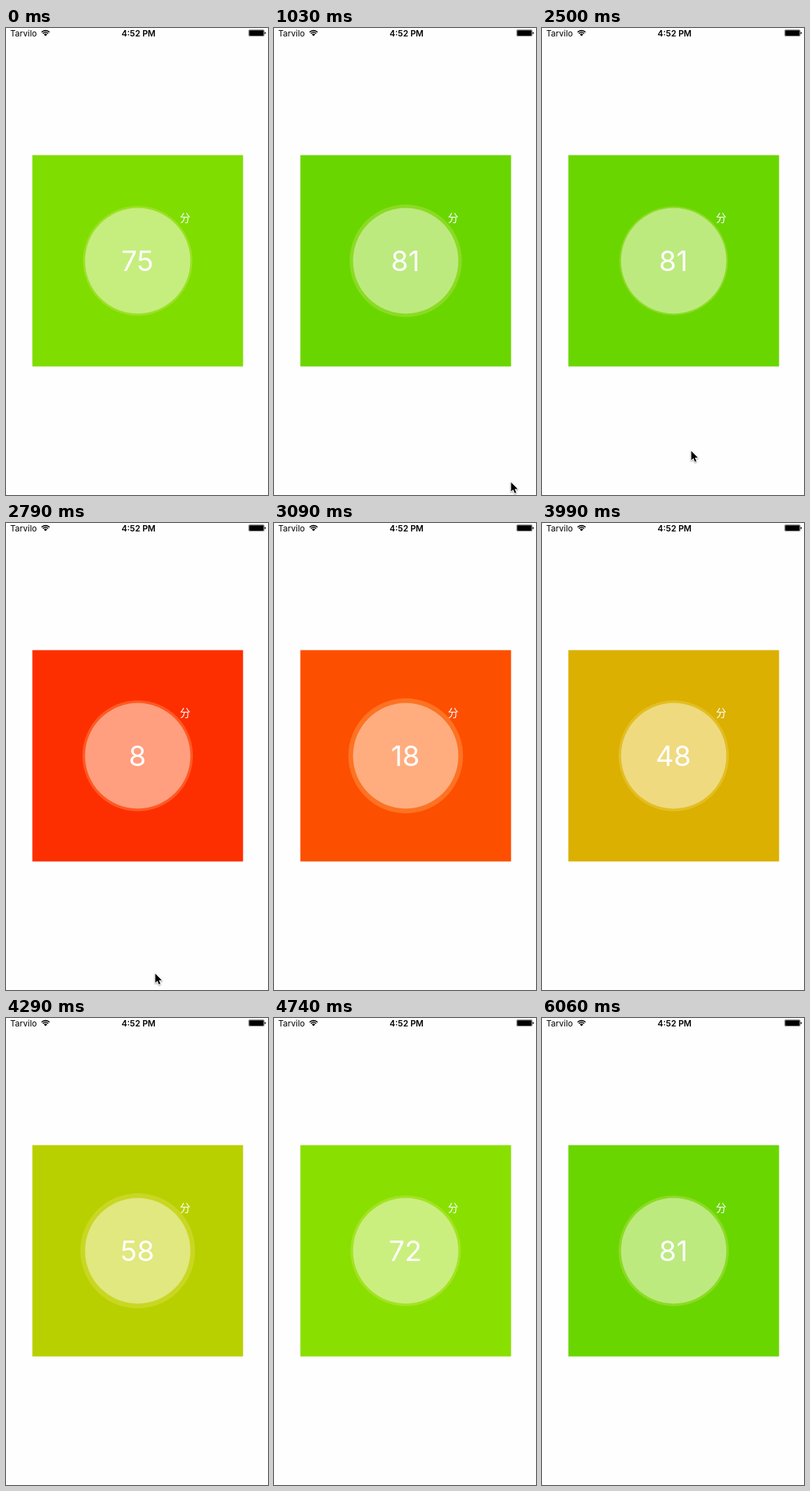
Recreate the animation shown at these times as an HTML page with a canvas. Size 373x663 px, loop 6.16 s.

```html
<!DOCTYPE html>
<html lang="en">
<head>
<meta charset="utf-8">
<title>Minute counter</title>
<style>
html, body { margin: 0; width: 100%; height: 100%; overflow: hidden; background: #fefefe; }
canvas { display: block; width: 373px; height: 663px; }
</style>
</head>
<body>
<canvas id="stage"></canvas>
<script>
const W = 373, H = 663, LOOP = 6160;
const CX = 187.5, CY = 330.5, DISC = 75;
const TAP = 2535, TICK = 30.25, GOAL = 81;
const SANS = 'Inter, Roboto, sans-serif';
const CJK = '"Noto Sans CJK SC", "Noto Sans CJK", "Noto Sans CJK JP", sans-serif';

const canvas = document.getElementById('stage');
const ctx = canvas.getContext('2d');
const dpr = window.devicePixelRatio || 1;
canvas.width = W * dpr;
canvas.height = H * dpr;
ctx.scale(dpr, dpr);

// The picture is held for about 147 ms at first, later for 150 ms.
function held(t) {
  const step = 2200 / 15;
  return t < 2640 ? Math.floor(t / step) * step : Math.floor((t + 60) / 150) * 150 - 60;
}

function countAt(t) {
  const n = t < TAP ? 75 + t / TICK : (t - TAP) / TICK;
  return Math.min(GOAL, Math.floor(n + 0.01));
}

// Red, through amber, to green.
function colorAt(n) {
  const red = Math.min(253, 383 - 3.42 * n);
  const green = Math.min(21 + 3.23 * n, 304 - 1.11 * n);
  return `rgb(${Math.round(red)}, ${Math.round(green)}, 0)`;
}

function ringAt(t) {
  return 79.5 - 2.3 * Math.cos((t - 160) / 1200 * 2 * Math.PI);
}

function label(text, x, y, font, color, align) {
  ctx.font = font;
  ctx.fillStyle = color;
  ctx.textAlign = align;
  ctx.fillText(text, x, y);
}

function disc(r, color) {
  ctx.fillStyle = color;
  ctx.beginPath();
  ctx.arc(CX, CY, r, 0, 2 * Math.PI);
  ctx.fill();
}

function wifi(x, y) {
  const from = -Math.PI * 0.75, to = -Math.PI * 0.25;
  ctx.strokeStyle = ctx.fillStyle = '#000';
  ctx.lineWidth = 1.6;
  for (const r of [8, 5.3]) {
    ctx.beginPath();
    ctx.arc(x, y, r, from, to);
    ctx.stroke();
  }
  ctx.beginPath();
  ctx.moveTo(x, y);
  ctx.arc(x, y, 3.4, from, to);
  ctx.fill();
}

function battery() {
  ctx.strokeStyle = 'rgba(0, 0, 0, 0.5)';
  ctx.fillStyle = '#000';
  ctx.lineWidth = 0.8;
  ctx.beginPath();
  ctx.roundRect(345.4, 2.5, 22.2, 9.2, 1.5);
  ctx.stroke();
  ctx.beginPath();
  ctx.roundRect(346.2, 3.3, 20.6, 7.6, 0.8);
  ctx.fill();
  ctx.beginPath();
  ctx.arc(368.2, 7.1, 1.6, -Math.PI / 2, Math.PI / 2);
  ctx.fill();
}

function statusBar() {
  label('Tarvilo', 6, 11.5, '400 12px ' + SANS, '#000', 'left');
  wifi(56.3, 11.6);
  label('4:52 PM', 188.7, 11.5, '600 12px ' + SANS, '#000', 'center');
  battery();
}

function pointer(x, y) {
  ctx.save();
  ctx.translate(x, y);
  ctx.beginPath();
  ctx.moveTo(0, 0);
  ctx.lineTo(0, 13);
  ctx.lineTo(3, 10.3);
  ctx.lineTo(5.2, 15.3);
  ctx.lineTo(7.3, 14.4);
  ctx.lineTo(5.2, 9.5);
  ctx.lineTo(9.4, 9.5);
  ctx.closePath();
  ctx.lineJoin = 'round';
  ctx.lineWidth = 2;
  ctx.strokeStyle = '#fff';
  ctx.shadowColor = 'rgba(0, 0, 0, 0.4)';
  ctx.shadowBlur = 2 * dpr;
  ctx.shadowOffsetY = dpr;
  ctx.stroke();
  ctx.shadowColor = 'transparent';
  ctx.fillStyle = '#000';
  ctx.fill();
  ctx.restore();
}

// The pointer rises from below, rests at (x, top) and drops out again.
function visit(t, mid, rest, x, top) {
  const y = top + 0.28 * Math.max(0, Math.abs(t - mid) - rest);
  if (y < H) pointer(x, y);
}

function draw(t) {
  const n = countAt(t);
  ctx.fillStyle = '#fefefe';
  ctx.fillRect(0, 0, W, H);
  statusBar();

  ctx.fillStyle = colorAt(n);
  ctx.fillRect(37.5, 180.5, 300, 300);
  disc(ringAt(t), 'rgba(255, 238, 160, 0.22)');
  disc(DISC, 'rgba(255, 255, 255, 0.42)');

  label(n, CX - 0.5, 344.8, '400 40px ' + SANS, '#fff', 'center');
  label('分', 255, 274.6, '300 15px ' + CJK, '#fff', 'center');

  visit(t, 1030, 10, 337.5, 645);
  visit(t, 2570, 80, 212.5, 600.5);
}

const start = performance.now();
function frame() {
  draw(held((performance.now() - start) % LOOP));
  requestAnimationFrame(frame);
}
frame();
</script>
</body>
</html>
```
